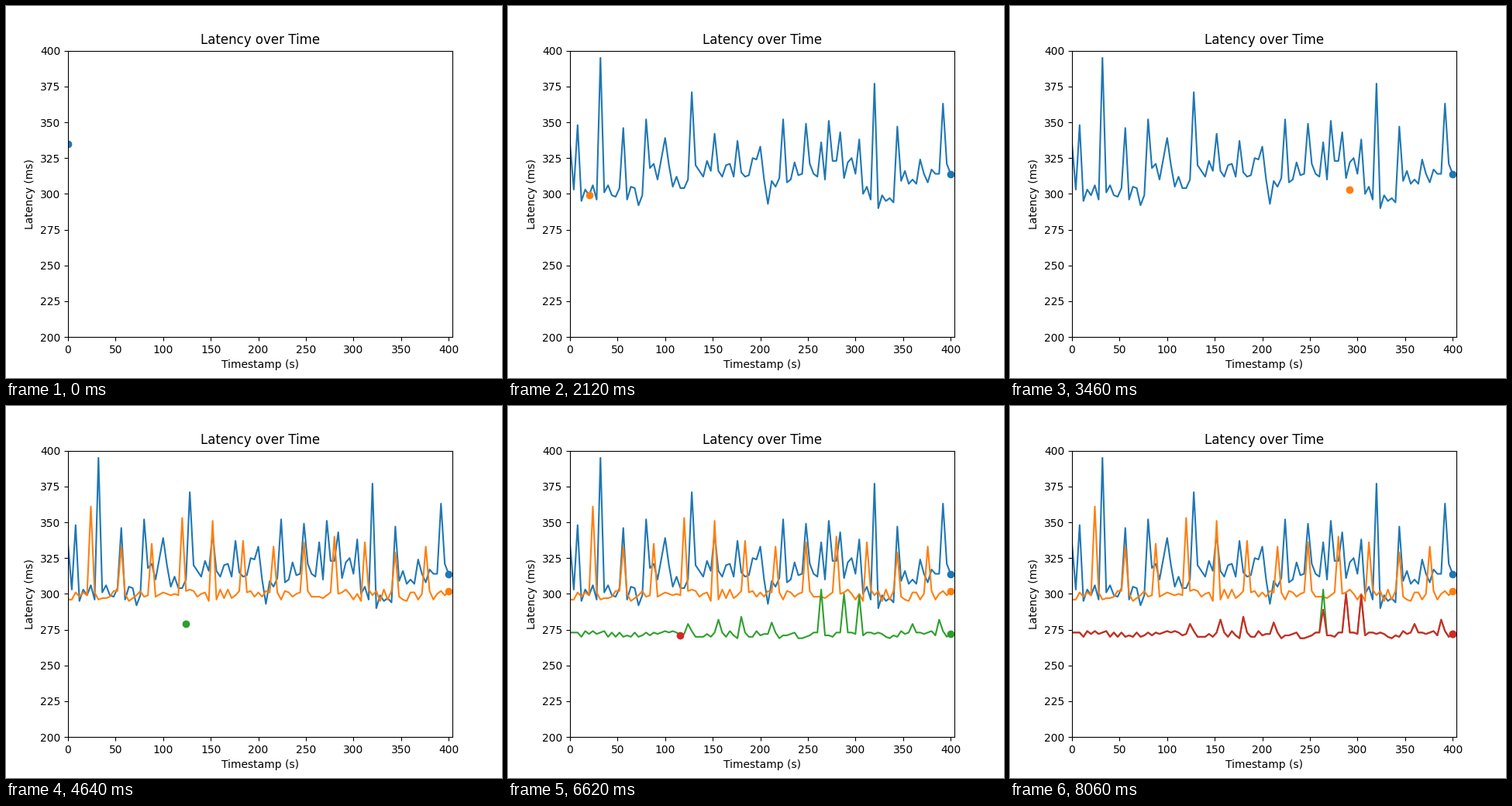
Recreate the animation shown at these times as a matplotlib script. Size 640 by 480 pixels, loop 8.28 s.

```python
import matplotlib.pyplot as plt
import numpy as np
from matplotlib.animation import FuncAnimation

TICK = 20
HOLD = 10  # extra ticks on the finished chart

rng = np.random.default_rng(4)

# One sample every 4 s, with the sample at 96 s missing.
times = np.delete(np.arange(0, 401, 4), 24)
count = len(times)
steps = count + 1  # a dot per sample, then the whole line


def spikes(start, period, heights):
    """Peaks at a fixed period, as time -> latency."""
    return {start + period * i: h for i, h in enumerate(heights)}


def jitter(floor, spread, peaks):
    """Whole-number noise around a floor, with the peaks set on top."""
    values = np.round(floor + rng.uniform(-spread, spread, count))
    for t, height in peaks.items():
        values[times == t] = height
    return values


# The first run drifts slowly; the others stay on a flat floor.
drift = np.interp(times,
                  [0, 76, 88, 110, 140, 196, 208, 236, 300, 316, 340, 352],
                  [303, 297, 318, 304, 316, 318, 300, 314, 318, 296, 297, 314])
first = jitter(drift, 8, spikes(
    8, 24, [348, 395, 346, 352, 320, 371, 342, 337, 333, 352, 349, 351,
            325, 377, 347, 324, 363]
) | {0: 335, 100: 339, 264: 336, 284: 343, 304: 338, 400: 314})
second = jitter(299, 4, spikes(
    24, 32, [361, 333, 335, 353, 351, 337, 333, 336, 340, 336, 329, 333]
) | {400: 302})
third = jitter(271.5, 2.5, {
    124: 279, 156: 282, 180: 284, 212: 280, 264: 303, 288: 300, 304: 299,
    360: 279, 388: 282, 400: 272})
# The last run repeats the third, with a lower spike at 264 s.
fourth = np.where(times == 264, 289, third)
runs = [first, second, third, fourth]

fig, ax = plt.subplots(figsize=(6.4, 4.8), dpi=100)
ax.set(xlim=(0, 404), ylim=(200, 400), title="Latency over Time",
       xlabel="Timestamp (s)", ylabel="Latency (ms)")

lines, dots = [], []
for i, run in enumerate(runs):
    lines += ax.plot(times, run, color=f"C{i}")
    dots += ax.plot([], [], "o", color=f"C{i}")


def draw(frame):
    for i, (run, line, dot) in enumerate(zip(runs, lines, dots)):
        step = frame - i * steps
        k = min(step, count - 1)
        line.set_visible(step >= count)
        dot.set_data(*(([times[k]], [run[k]]) if step >= 0 else ([], [])))
    return lines + dots


anim = FuncAnimation(fig, draw, frames=len(runs) * steps + HOLD,
                     interval=TICK, repeat=True, repeat_delay=0)
plt.show()
```
